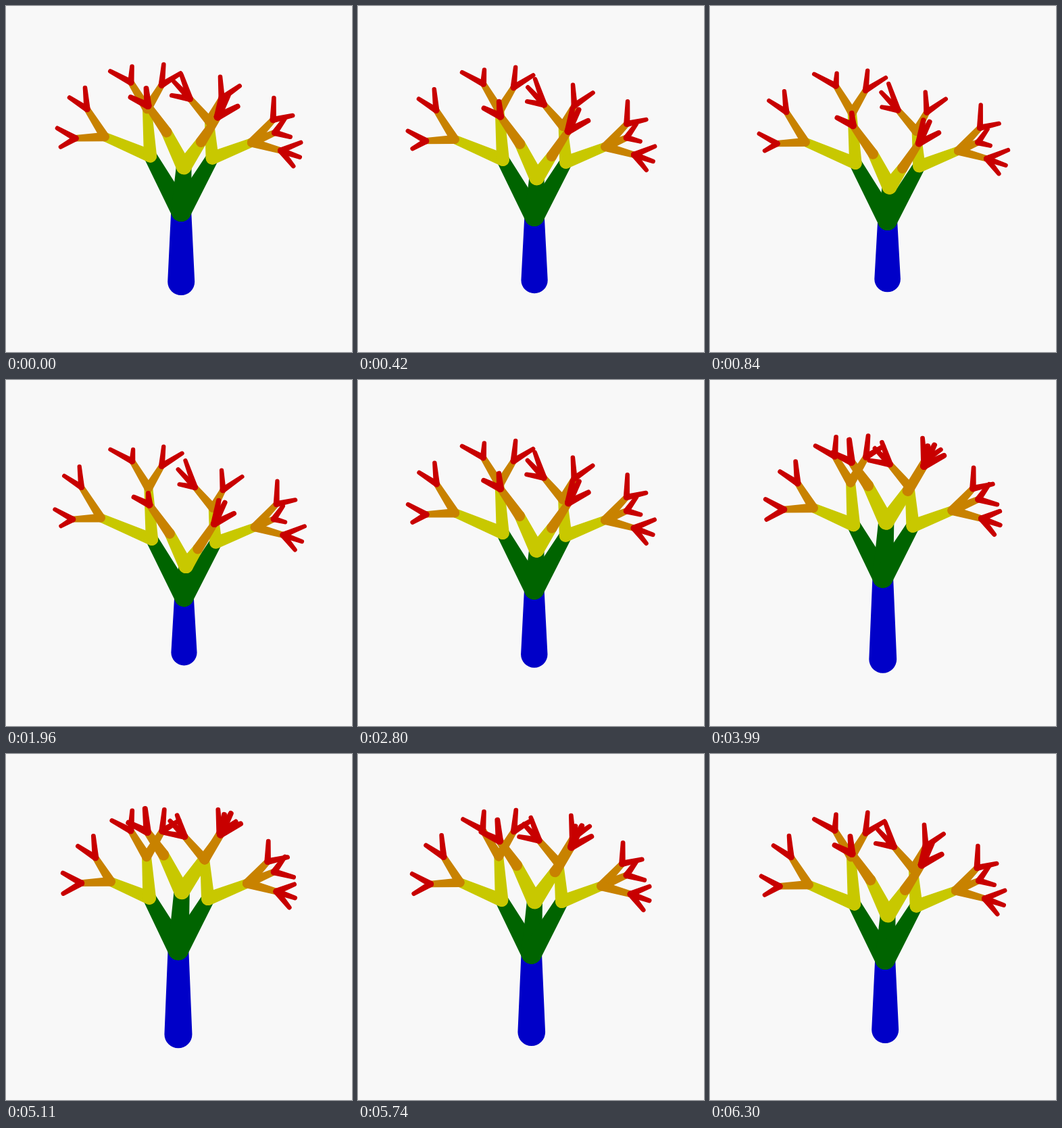
Write an HTML page with a canvas that moves like this. It is 512x512 px and loops after 6370 ms.

```html
<!DOCTYPE html>
<html lang="en">
<head>
<meta charset="utf-8">
<title>Breathing tree</title>
<style>
  html, body { margin: 0; width: 100%; height: 100%; overflow: hidden; background: #f8f8f8; }
  canvas { display: block; }
</style>
</head>
<body>
<canvas id="stage" width="512" height="512"></canvas>
<script>
const ctx = document.getElementById('stage').getContext('2d');
const STEP = 70, STEPS = 91;
const COLORS = ['#0000c8', '#006400', '#c8c800', '#c88200', '#c80000'];
const RADII = [20, 15, 9.6, 6.8, 4.7, 3.3];

// A branch keeps its direction (dx, dy); its length changes by the share `sway`.
const branch = (dx, dy, sway, ...kids) => ({ dx, dy, sway, kids, girth: 1 });

const left = branch(-45.7, -82, .095,
  branch(-67.5, -28.5, .186,
    branch(-43, 2.3, .014, branch(-27, -15, .02), branch(-22, 12.7, -.19)),
    branch(-26, -41, .171, branch(-26, -17, .025), branch(-3, -31.5, .007))),
  branch(-4.7, -69.5, .158,
    branch(-24, -39.5, .05, branch(-30.5, -16.5, .12), branch(1.7, -23.5, -.25)),
    branch(21.5, -35.5, -.05, branch(3, -30.5, -.015), branch(28, -17.5, .136))));

const front = branch(4, -66, -.295,
  branch(-25.7, -51.5, -.027,
    branch(-27.5, -39, .162, branch(-25.5, -12.5, -.07), branch(-2.5, -25.5, -.34))),
  branch(25.5, -37, -.3,
    branch(24.5, -37, .05, branch(6, -32, .13), branch(15.5, -31.5, .05), branch(29.5, -15.5, .03))));

const right = branch(46, -79, .074,
  branch(-4.5, -54.7, -.03,
    branch(-28.5, -33, -.02, branch(-27, -5, -.12), branch(-23.5, -25, .115), branch(-12.8, -36, .16)),
    branch(18.5, -33.5, -.175, branch(-2.2, -32, -.05), branch(26.5, -18.5, .13))),
  branch(58.5, -23, .036,
    branch(31.5, -33.5, .069, branch(1.2, -32.5, .105), branch(29, -6.5, .01)),
    branch(34, -14.5, -.149, branch(15, -21, -.05), branch(23, 6.2, -.25)),
    branch(43, 12, .018, branch(29.5, -12, .14), branch(28, 9.7, .05), branch(18.5, 23, 0))));

const trunk = branch(0, -104, -.186, left, front, right);

const thicken = (b, girth) => { b.girth = girth; b.kids.forEach(k => thicken(k, girth)); };
thicken(front, 1.18);

function limb(x0, y0, r0, x1, y1, r1) {
  const a = Math.atan2(y1 - y0, x1 - x0), q = Math.PI / 2;
  ctx.beginPath();
  ctx.arc(x0, y0, r0, a + q, a + 3 * q);
  ctx.arc(x1, y1, r1, a - q, a + q);
  ctx.fill();
}

function draw(s) {
  const zoom = 1 - .038 * s - .011 * s * s;
  ctx.fillStyle = '#f8f8f8';
  ctx.fillRect(0, 0, 512, 512);
  let tier = [{ b: trunk, x: 259.2 + 4.6 * s, y: 408 - 6.2 * s + 1.2 * s * s, r: RADII[0] }];
  // Each tier is painted over the one it grows from.
  COLORS.forEach((color, level) => {
    ctx.fillStyle = color;
    tier = tier.flatMap(({ b, x, y, r }) => {
      const k = zoom * (1 + b.sway * s);
      const endX = x + b.dx * k, endY = y + b.dy * k, endR = RADII[level + 1] * b.girth;
      limb(x, y, r * zoom, endX, endY, endR * zoom);
      return b.kids.map(kid => ({ b: kid, x: endX, y: endY, r: endR }));
    });
  });
}

function tick() {
  const step = Math.floor(performance.now() / STEP) % STEPS;
  draw(Math.sin(2 * Math.PI * step / (STEPS - 1)));
  requestAnimationFrame(tick);
}
tick();
</script>
</body>
</html>
```
